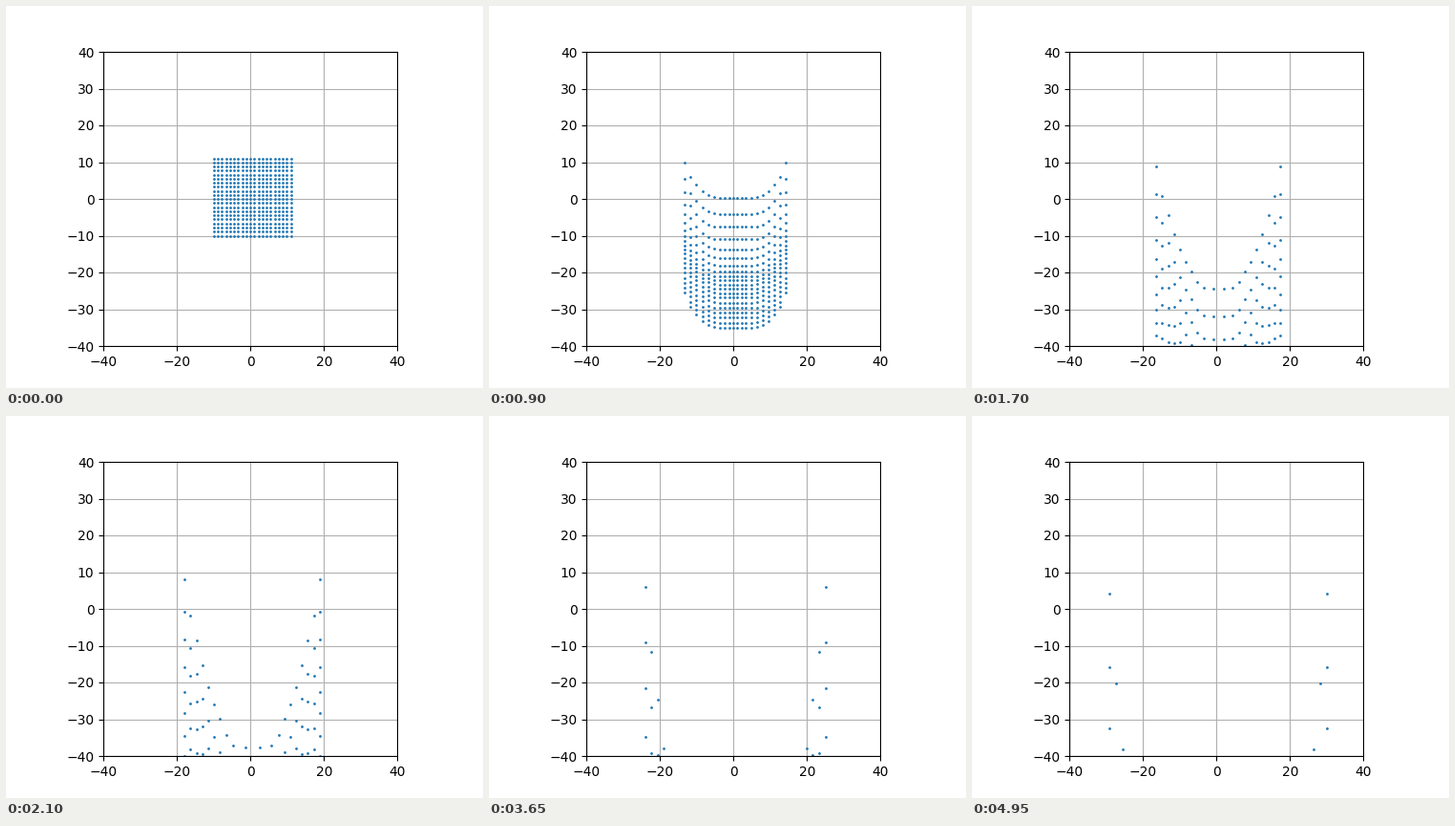
A matplotlib script for the animation above (5 s loop, 500 px wide and 400 px high).

```python
import numpy as np
import matplotlib.pyplot as plt
from matplotlib.animation import FuncAnimation

FRAMES, INTERVAL = 100, 50
N = 20
REACH = 1.55      # particles closer than this touch
STIFFNESS = 0.17  # repulsion per unit of overlap
PULL = 0.034      # downward pull gained from every touching neighbour


def acceleration(pos):
    """Soft repulsion plus a downward pull, both only while in contact."""
    gap = pos[:, None] - pos[None]
    dist = np.hypot(gap[..., 0], gap[..., 1])
    np.fill_diagonal(dist, np.inf)
    touching = dist < REACH
    push = np.where(touching, STIFFNESS * (REACH - dist) / dist, 0)
    acc = (push[..., None] * gap).sum(axis=1)
    acc[:, 1] -= PULL * touching.sum(axis=1)
    return acc


def simulate():
    """Positions of all particles, one array per frame."""
    side = np.linspace(-10, 11, N)
    pos = np.array([(x, y) for y in side for x in side])
    vel = np.zeros_like(pos)
    path = [pos]
    for _ in range(FRAMES - 1):
        vel = vel + acceleration(pos)
        pos = pos + vel
        path.append(pos)
    return path


path = simulate()

fig, ax = plt.subplots(figsize=(5, 4), dpi=100)
ax.set_aspect("equal")
ax.set_xlim(-40, 40)
ax.set_ylim(-40, 40)
ax.set_xticks(range(-40, 41, 20))
ax.set_yticks(range(-40, 41, 10))
ax.grid(True)
dots, = ax.plot([], [], "o", ms=1, color="C0")


def draw(i):
    dots.set_data(*path[i].T)
    return dots,


anim = FuncAnimation(fig, draw, frames=FRAMES, interval=INTERVAL,
                     repeat=True, repeat_delay=0)
plt.show()
```
